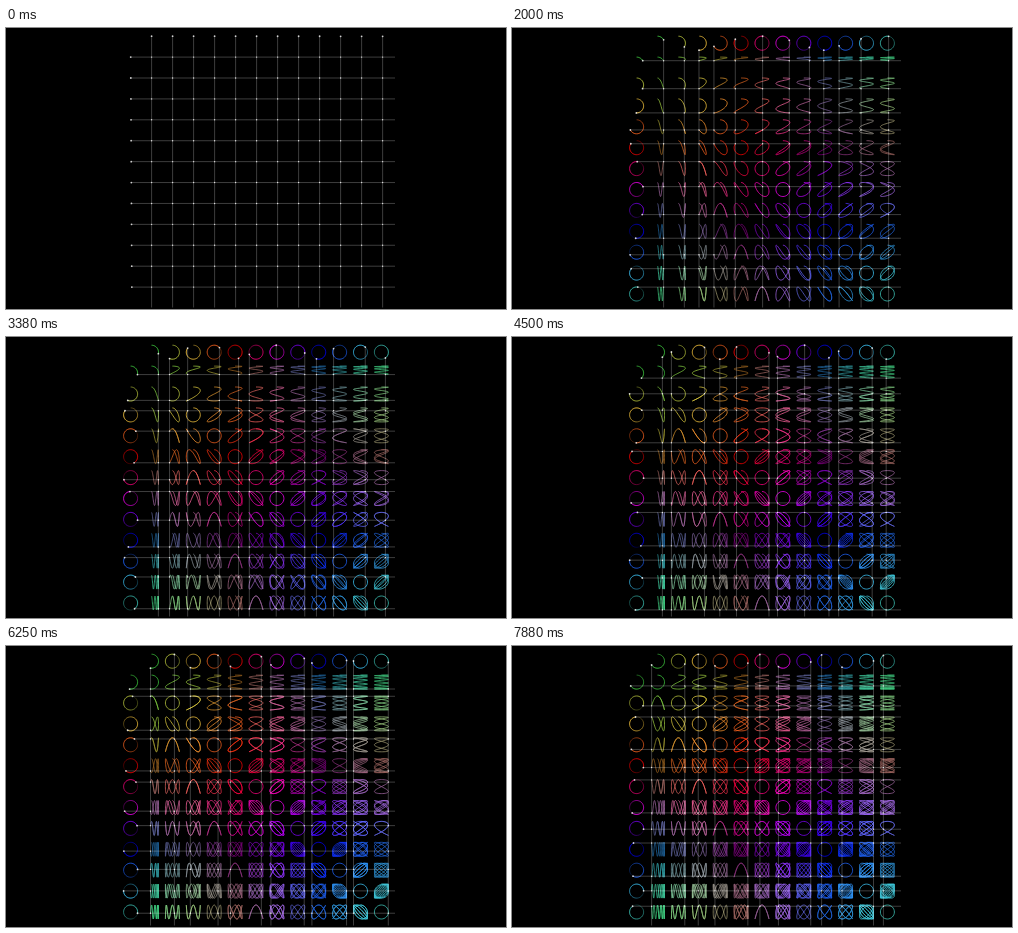
Animation, 500 px wide and 281 px high, one loop 8 s. Source, as an HTML page with a canvas:

```html
<!DOCTYPE html>
<html lang="en">
<head>
<meta charset="utf-8">
<title>Lissajous table</title>
<style>
html, body { margin: 0; width: 100%; height: 100%; overflow: hidden; background: #000; }
canvas { display: block; width: 100vw; height: 100vh; }
</style>
</head>
<body>
<canvas id="stage"></canvas>
<script>
const W = 500, H = 281;
const LOOP = 8000, STEP = 125, TURN = 12000, LEAD = 28;
const N = 12, GAP = 20.9, R = 7;
const LEFT = 124.6, TOP = 15.2;
const TAU = Math.PI * 2;

const canvas = document.getElementById('stage');
const ctx = canvas.getContext('2d');

const colX = k => LEFT + GAP * k;
const rowY = k => TOP + GAP * k;
const orbitX = (c, a) => c + R * Math.sin(a);
const orbitY = (c, a) => c - R * Math.cos(a);
const gcd = (a, b) => b ? gcd(b, a % b) : a;

// Hue for a frequency, as RGB, with the greens softened
function hueRgb(k) {
  const h = (510 - 30 * k) % 360;
  const [r, g, b] = [0, 8, 4].map(n => {
    const s = (n + h / 30) % 12;
    return 127.5 - 127.5 * Math.max(-1, Math.min(s - 3, 9 - s, 1));
  });
  return [Math.min(255, r + g * 0.25), g * 0.8, Math.min(255, b + g * 0.25)];
}

const hues = Array.from({ length: N + 1 }, (_, k) => hueRgb(k));
const css = rgb => `rgb(${rgb.map(Math.round).join(',')})`;
const mix = (a, b) => css(a.map((v, i) => (v + b[i]) / 2));

// Circle trail that dims with distance behind the dot
function trail(cx, cy, k, angle, floor) {
  const len = Math.min(angle, TAU);
  const parts = Math.ceil(len / TAU * 36);
  ctx.strokeStyle = css(hues[k]);
  for (let i = 0; i < parts; i++) {
    const from = angle - len * (i + 1) / parts;
    const to = angle - len * i / parts;
    const age = (angle - to) / TAU;
    ctx.globalAlpha = 0.9 * (1 - (1 - floor) * age ** 1.4);
    ctx.beginPath();
    ctx.arc(cx, cy, R, from - TAU / 4, to - TAU / 4 + 0.02);
    ctx.stroke();
  }
}

// Drawn only until the figure closes
function curve(row, col, base) {
  const cx = colX(col), cy = rowY(row);
  const end = Math.min(base, TAU / gcd(row, col));
  const steps = Math.ceil(end * Math.max(row, col) / TAU * 32);
  ctx.strokeStyle = mix(hues[row], hues[col]);
  ctx.beginPath();
  for (let i = 0; i <= steps; i++) {
    const a = end * i / steps;
    ctx.lineTo(orbitX(cx, a * col), orbitY(cy, a * row));
  }
  ctx.stroke();
}

function line(x1, y1, x2, y2) {
  ctx.beginPath();
  ctx.moveTo(x1, y1);
  ctx.lineTo(x2, y2);
  ctx.stroke();
}

function dot(x, y, r) {
  ctx.beginPath();
  ctx.arc(x, y, r, 0, TAU);
  ctx.fill();
}

function draw(time) {
  const base = TAU * (time + LEAD) / TURN;
  ctx.globalAlpha = 1;
  ctx.fillStyle = '#000';
  ctx.fillRect(0, 0, W, H);
  ctx.lineJoin = 'round';

  ctx.lineWidth = 1;
  if (time > 0) {
    for (let k = 1; k <= N; k++) {
      trail(colX(k), TOP, k, base * k, 0.3);
      trail(LEFT, rowY(k), k, base * k, 0.08);
    }
    ctx.globalAlpha = 0.75;
    for (let row = 1; row <= N; row++) {
      for (let col = 1; col <= N; col++) curve(row, col, base);
    }
  }

  const xs = [], ys = [];
  ctx.globalAlpha = 1;
  ctx.lineWidth = 0.8;
  ctx.strokeStyle = 'rgba(255,255,255,0.3)';
  ctx.fillStyle = 'rgba(255,255,255,0.8)';
  for (let k = 1; k <= N; k++) {
    const a = base * k;
    const x = orbitX(colX(k), a), y = orbitY(rowY(k), a);
    const topY = orbitY(TOP, a), leftX = orbitX(LEFT, a);
    xs.push(x);
    ys.push(y);
    line(x, topY, x, 279.5);
    line(leftX, y, 389, y);
    dot(x, topY, 0.9);
    dot(leftX, y, 0.9);
  }
  for (const y of ys) for (const x of xs) dot(x, y, 0.7);
}

function resize() {
  const dpr = window.devicePixelRatio || 1;
  canvas.width = Math.round(innerWidth * dpr);
  canvas.height = Math.round(innerHeight * dpr);
  ctx.setTransform(canvas.width / W, 0, 0, canvas.height / H, 0, 0);
  shown = -1;
}

let shown = -1, start = null;
function tick(now) {
  if (start === null) start = now;
  const time = Math.floor(((now - start) % LOOP) / STEP) * STEP;
  if (time !== shown) {
    shown = time;
    draw(time);
  }
  requestAnimationFrame(tick);
}

addEventListener('resize', resize);
resize();
draw(0);
requestAnimationFrame(tick);
</script>
</body>
</html>
```
